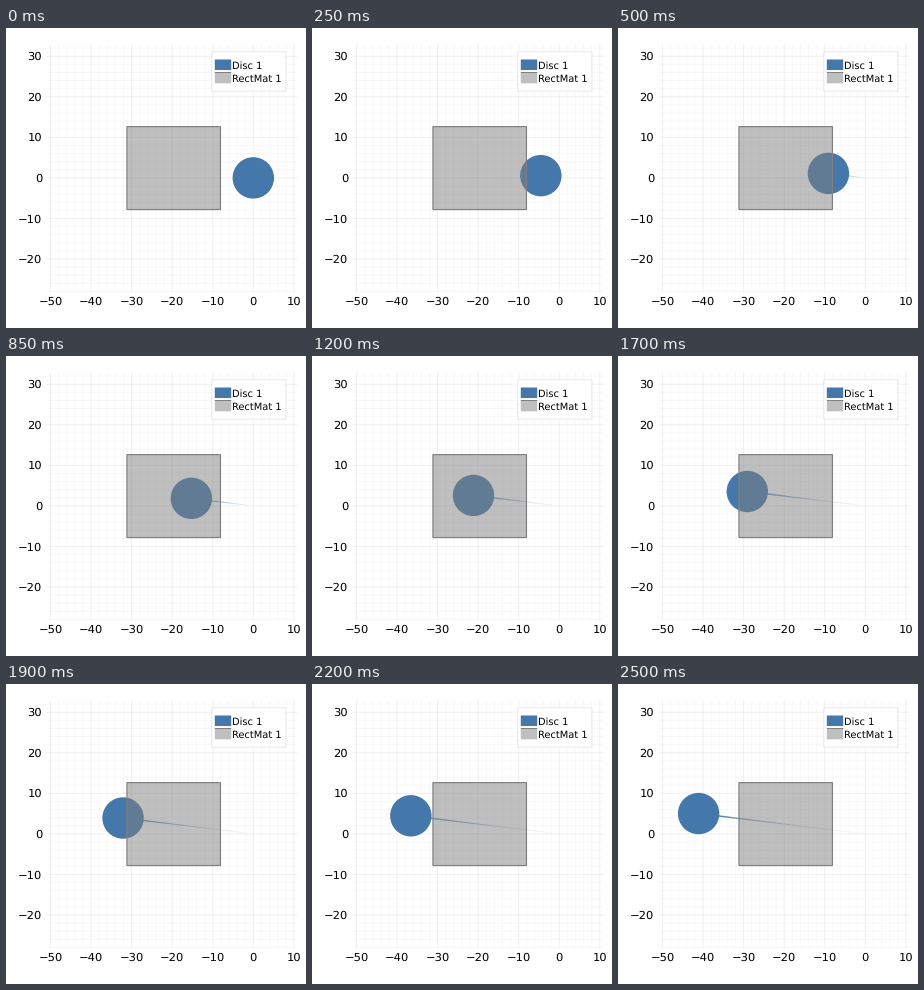
A matplotlib script for the animation above (2.55 s loop, 300x300 px).

```python
import numpy as np
import matplotlib.pyplot as plt
from matplotlib.animation import FuncAnimation
from matplotlib.collections import LineCollection
from matplotlib.colors import to_rgba
from matplotlib.patches import Circle, Rectangle

SIZE, FRAMES, STEP_MS = 300, 51, 50
PX = 0.72                       # points per pixel at 100 dpi
UNIT = 4.056                    # pixels per data unit
ORIGIN = (247.3, 149.9)
LEFT, RIGHT, TOP, BOTTOM = 41, 292, 16, 264
BLUE, GRAY = "#4477AA", (0.5, 0.5, 0.5)

# Motion in pixels per step: the disc is slowed while its centre is on the mat.
SPEED, DRAG, SLOPE = 3.69, 0.0235, 0.122
ENTER, LEAVE = 8.8, 36.5

plt.rcParams["font.family"] = "DejaVu Sans"
plt.rcParams["text.hinting"] = "none"
plt.rcParams["path.snap"] = False

fig = plt.figure(figsize=(3, 3), dpi=100, facecolor="white")
ax = fig.add_axes([0, 0, 1, 1])
ax.set_xlim(0, SIZE)
ax.set_ylim(SIZE, 0)
ax.axis("off")


def to_px(x, y):
    return ORIGIN[0] + x * UNIT, ORIGIN[1] - y * UNIT


def label(x, y, text, size, ha):
    ax.text(x, y, text, fontsize=size * PX, ha=ha, va="baseline",
            color="black", zorder=9)


def box(x0, y0, x1, y1, face, edge, z, width=1.0):
    ax.add_patch(Rectangle((x0, y0), x1 - x0, y1 - y0, facecolor=face,
                           edgecolor=edge, linewidth=width * PX, zorder=z))


def line(xs, ys, color, alpha=1.0, z=1):
    ax.plot(xs, ys, color=color, alpha=alpha, lw=PX, zorder=z,
            solid_capstyle="butt")


def draw_grid():
    def shade(v):
        return 0.06 if v % 10 == 0 else 0.028

    for v in range(-50, 11, 2):
        x = to_px(v, 0)[0]
        line([x, x], [TOP, BOTTOM], "black", shade(v))
    for v in range(-28, 33, 2):
        y = to_px(0, v)[1]
        line([LEFT, RIGHT], [y, y], "black", shade(v))


def draw_ticks():
    def tick_text(v):
        return str(v).replace("-", "\u2212")

    for v in range(-50, 11, 10):
        label(to_px(v, 0)[0], 277, tick_text(v), 11.5, "center")
    for v in range(-20, 31, 10):
        label(36.2, to_px(0, v)[1] + 4, tick_text(v), 11.5, "right")


def draw_legend():
    box(205.8, 23.8, 279.9, 63.2, "white", (0.91, 0.91, 0.91), 7)
    box(208.8, 31.5, 225.2, 42, BLUE, "none", 8)
    box(208.8, 45, 225.2, 55.3, (0.75, 0.75, 0.75), "none", 8)
    line([208.8, 225.2], [44.5, 44.5], GRAY, z=8)
    label(226.5, 41, "Disc 1", 9.9, "left")
    label(226.5, 54, "RectMat 1", 9.9, "left")


def disc_center(step):
    slowed = min(max(step - ENTER, 0), LEAVE - ENTER)
    after = max(step - LEAVE, 0)
    shift = SPEED * step - DRAG * (slowed ** 2 / 2 + slowed * after)
    return ORIGIN[0] - shift, ORIGIN[1] - SLOPE * shift


draw_grid()
draw_ticks()
draw_legend()

trail = LineCollection([], zorder=2, capstyle="butt")
ax.add_collection(trail, autolim=False)
disc = Circle(ORIGIN, 20.7, facecolor=BLUE, edgecolor="none", zorder=3)
ax.add_patch(disc)

mat_left, mat_top = to_px(-31.15, 12.65)
mat_right, mat_bottom = to_px(-8.1, -7.8)
box(mat_left, mat_top, mat_right, mat_bottom, (*GRAY, 0.5), GRAY, 4, 1.2)


def update(step):
    disc.center = disc_center(step)
    points = [disc_center(k) for k in range(step + 1)]
    fade = np.arange(1, step + 1) / max(step, 1)
    trail.set_segments([points[k:k + 2] for k in range(step)])
    trail.set_color([to_rgba(BLUE, a) for a in fade])
    trail.set_linewidth(np.maximum(0.6, 1.8 * fade) * PX if step else [0])
    return trail, disc


anim = FuncAnimation(fig, update, frames=FRAMES, interval=STEP_MS,
                     repeat=True, repeat_delay=0, blit=False)
plt.show()
```
